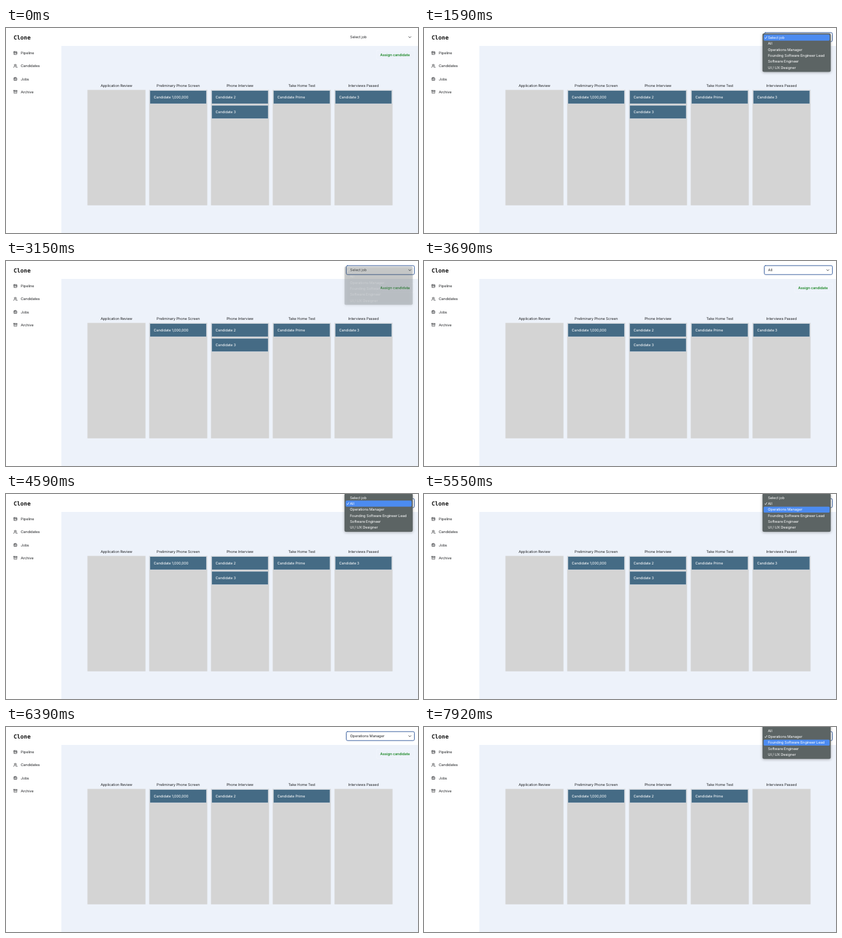
Write an HTML page with a canvas that moves like this. It is 640 px wide and 320 px high and loops after 8 s.

```html
<!DOCTYPE html>
<html lang="en">
<head>
<meta charset="utf-8">
<title>Hiring pipeline</title>
<style>
  html, body { margin: 0; width: 100%; height: 100%; overflow: hidden; background: #fff; }
  canvas { display: block; width: 640px; height: 320px; }
</style>
</head>
<body>
<canvas id="stage"></canvas>
<script>
const canvas = document.getElementById('stage');
const ctx = canvas.getContext('2d');
const dpr = window.devicePixelRatio || 1;
canvas.width = 640 * dpr;
canvas.height = 320 * dpr;

const LOOP = 8000;
const SANS = 'Inter, "Open Sans", sans-serif';
const MONO = '"DejaVu Sans Mono", monospace';
const INK = '#242629';
const ROW = 9.36;
const JOBS = ['Select job', 'All', 'Operations Manager',
  'Founding Software Engineer Lead', 'Software Engineer', 'UI / UX Designer'];
const NAV = ['Pipeline', 'Candidates', 'Jobs', 'Archive'];
const STAGES = ['Application Review', 'Preliminary Phone Screen',
  'Phone Interview', 'Take Home Test', 'Interviews Passed'];
const ALL_CARDS = [[], ['Candidate 1,000,000'], ['Candidate 2', 'Candidate 3'],
  ['Candidate Prime'], ['Candidate 3']];
const MANAGER_CARDS = [[], ['Candidate 1,000,000'], ['Candidate 2'],
  ['Candidate Prime'], []];

// Each visit to the menu: opened, pointer moved, item picked, value applied.
const VISITS = [
  { open: 1590, move: 2310, pick: 3000, apply: 3270, from: 0, to: 1, litFade: false },
  { open: 4590, move: 5040, pick: 5790, apply: 6150, from: 1, to: 2, litFade: true },
  { open: 7290, move: 7740, pick: Infinity, apply: Infinity, from: 2, to: 3 }
];

function text(str, x, y, color = INK, { align = 'left', weight = 400, size = 5.7,
  family = SANS, spacing = -0.1 } = {}) {
  ctx.font = `${weight} ${size}px ${family}`;
  ctx.letterSpacing = spacing + 'px';
  ctx.textAlign = align;
  ctx.fillStyle = color;
  ctx.fillText(str, x, y);
}

function rect(x, y, w, h, color) {
  ctx.fillStyle = color;
  ctx.fillRect(x, y, w, h);
}

function round(x, y, w, h, r) {
  ctx.beginPath();
  ctx.roundRect(x, y, w, h, r);
}

function line(color, width, ...points) {
  ctx.strokeStyle = color;
  ctx.lineWidth = width;
  ctx.beginPath();
  points.forEach(([x, y], i) => i ? ctx.lineTo(x, y) : ctx.moveTo(x, y));
  ctx.stroke();
}

function outline(x, y, w, h, r = 0.6) {
  round(x, y, w, h, r);
  ctx.strokeStyle = INK;
  ctx.lineWidth = 0.6;
  ctx.stroke();
}

const ICONS = [
  () => {
    outline(0.4, 0.4, 4.8, 4.8);
    line(INK, 0.6, [0.4, 1.9], [5.2, 1.9]);
    line(INK, 0.6, [1.9, 1.9], [1.9, 4]);
    line(INK, 0.6, [3.6, 1.9], [3.6, 3.2], [5.2, 3.2]);
  },
  () => {
    outline(1.1, 0.4, 2.2, 2.2, 1.1);
    line(INK, 0.6, [0.2, 5.2], [0.4, 4.1], [1.3, 3.5], [3, 3.5], [3.9, 4.1], [4.1, 5.2]);
    line(INK, 0.6, [4, 0.6], [4.7, 1.2], [4.6, 2.1], [4, 2.5]);
    line(INK, 0.6, [4.7, 3.6], [5.5, 4.3], [5.6, 5.2]);
  },
  () => {
    outline(0.3, 1.5, 5, 3.6);
    line(INK, 0.6, [1.8, 5.1], [1.8, 0.5], [3.8, 0.5], [3.8, 5.1]);
  },
  () => {
    outline(0.3, 0.6, 5.2, 1.3, 0.2);
    line(INK, 0.6, [0.7, 1.9], [0.7, 5.1], [5.1, 5.1], [5.1, 1.9]);
    line(INK, 0.6, [2.2, 3.1], [3.6, 3.1]);
  }
];

function drawPage(cards) {
  rect(0, 0, 640, 320, '#fff');
  rect(86, 28, 554, 292, '#edf2fa');
  text('Clone', 11.7, 17.5, '#111', { weight: 700, size: 8.8, family: MONO, spacing: 0 });

  NAV.forEach((label, i) => {
    const y = 39.2 + i * 20.15;
    ctx.save();
    ctx.translate(11.7, y - 2.9);
    ICONS[i]();
    ctx.restore();
    text(label, 23, y + 2);
  });

  round(575.5, 35, 59, 14, 2);
  ctx.strokeStyle = 'rgba(255,255,255,.35)';
  ctx.lineWidth = 0.6;
  ctx.stroke();
  text('Assign candidate', 581.3, 44.1, '#228b2c', { weight: 600 });

  STAGES.forEach((name, i) => {
    const x = 126.5 + i * 95.95;
    text(name, x + 45, 91.7, INK, { align: 'center' });
    rect(x, 96.6, 90.2, 180.2, '#d4d4d4');
    cards[i].forEach((label, n) => {
      const y = 98 + n * 23.2;
      rect(x + 0.7, y - 0.7, 88.6, 21.2, '#c3d0dc');
      rect(x + 1.5, y, 87, 19.9, '#456b85');
      text(label, x + 7.1, y + 12.1, '#fff');
    });
  });
}

function drawSelect(label, focused) {
  if (focused) {
    round(528.6, 7.2, 105.8, 14, 2);
    ctx.fillStyle = '#fff';
    ctx.fill();
    ctx.strokeStyle = '#3d63a0';
    ctx.lineWidth = 1;
    ctx.stroke();
  }
  text(label, 534.6, 16.4);
  line(INK, 0.8, [625.6, 13.5], [627.3, 15.2], [629, 13.5]);
}

function drawMenu(checked, lit, alpha) {
  const top = 15 - (checked + 0.5) * ROW - 1.7;
  const height = JOBS.length * ROW + 3.6;
  ctx.save();
  ctx.globalAlpha = alpha;
  ctx.shadowColor = 'rgba(0,0,0,.3)';
  ctx.shadowBlur = 4 * dpr;
  ctx.shadowOffsetY = dpr;
  round(525.8, top, 106, height, 2.2);
  ctx.fillStyle = '#5c6464';
  ctx.fill();
  ctx.shadowColor = 'transparent';
  JOBS.forEach((job, i) => {
    const y = 15 + (i - checked) * ROW;
    if (i === lit) {
      round(527.6, y - ROW / 2, 102.5, ROW, 1.6);
      ctx.fillStyle = '#4c8bf0';
      ctx.fill();
    }
    if (i === checked) line('#fff', 0.75, [529.6, y + 0.4], [530.6, y + 1.7], [532.6, y - 1.6]);
    text(job, 534.3, y + 2, '#fff');
  });
  ctx.restore();
}

function render(t) {
  ctx.setTransform(dpr, 0, 0, dpr, 0, 0);
  ctx.textRendering = 'geometricPrecision';
  ctx.lineCap = ctx.lineJoin = 'round';

  let value = 0;
  for (const v of VISITS) if (t >= v.apply) value = v.to;
  drawPage(value === 2 ? MANAGER_CARDS : ALL_CARDS);
  drawSelect(JOBS[value], t >= VISITS[0].open);

  const visit = VISITS.find(v => t >= v.open && t < v.pick + 240);
  if (!visit) return;
  const since = t - visit.pick;
  let lit = t < visit.move ? visit.from : visit.to;
  // The picked row blinks once, then the menu fades away.
  if ((since >= 0 && since < 60) || (since >= 90 && !visit.litFade)) lit = -1;
  const fade = Math.min(1, Math.max(0, (since - 90) / 150));
  drawMenu(visit.from, lit, Math.pow(1 - fade, 2.5));
}

const start = performance.now();
function tick() {
  render((performance.now() - start) % LOOP);
  requestAnimationFrame(tick);
}
tick();
</script>
</body>
</html>
```
